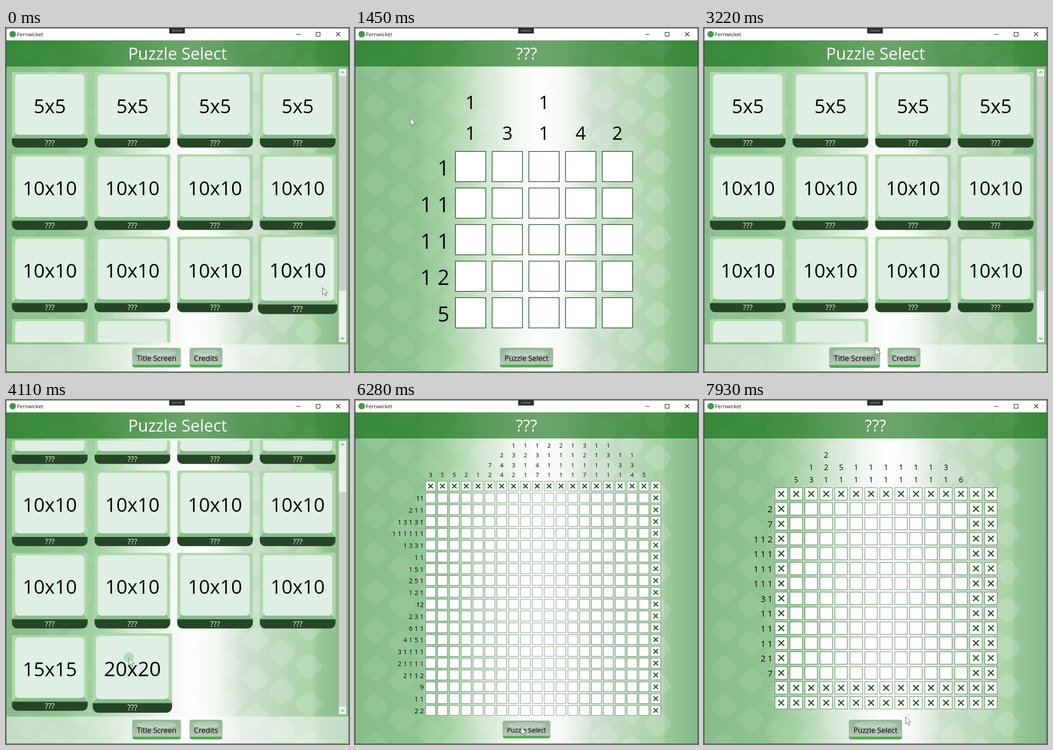
An HTML page with a canvas for the animation above (8000 ms loop, 746 by 751 pixels).

```html
<!DOCTYPE html>
<html lang="en">
<head>
<meta charset="utf-8">
<title>Puzzle Select</title>
<style>
  html, body { margin: 0; width: 100%; height: 100%; overflow: hidden; background: #fff; }
  canvas { display: block; }
</style>
</head>
<body>
<canvas id="stage" width="746" height="751"></canvas>
<script>
const W = 746, H = 751, LOOP = 8000;
const ctx = document.getElementById('stage').getContext('2d');

// Pointer moves; one that names a screen ends with a click that opens it.
const START = { x: 688, y: 566 };
const MOVES = [
  { from: 120, to: 480, x: 569, y: 617 },
  { from: 680, to: 1150, x: 120, y: 196, opens: 'small' },
  { from: 1650, to: 2400, x: 410, y: 708 },
  { from: 2860, to: 2870, x: 410, y: 708, opens: 'select' },
  { from: 3130, to: 3220, x: 372, y: 698 },
  { from: 3290, to: 3920, x: 267, y: 563, opens: 'large' },
  { from: 4320, to: 4680, x: 313, y: 431 },
  { from: 4880, to: 5640, x: 500, y: 671 },
  { from: 5710, to: 6150, x: 361, y: 714, opens: 'select' },
  { from: 6500, to: 7100, x: 105, y: 669, opens: 'medium' },
  { from: 7430, to: 7930, x: 438, y: 691 }
];
const PRESS = 90, RELEASE = 180, OPEN = 260;

// x, y: middle of the first cell. Clues: one base-36 digit per number.
const PUZZLES = {
  small: { x: 251.5, y: 302.5, pitch: 79.8, cols: '11 3 11 4 2', rows: '1 11 11 12 5' },
  medium: {
    x: 168, y: 205, pitch: 32.57,
    cols: '0 5 13 221 51 11 11 11 11 11 11 31 6 0 0',
    rows: '0 2 7 112 111 111 111 31 11 11 11 21 7 0 0'
  },
  large: {
    x: 164.5, y: 188, pitch: 25.77,
    cols: '3 5 5 2 1 72 244 1332 1211 1347 2111 2111 1111 3217 1111 1311 131 134 5 0',
    rows: '0 b 211 13131 111111 1331 11 151 251 121 c 231 611 4151 31111 21111 2112 9 11 22'
  }
};
const parseClues = str => str.split(' ').map(clue => [...clue].map(d => parseInt(d, 36)));

function stateAt(t) {
  let { x, y } = START, screen = 'select', down = false, released = -1;
  for (const move of MOVES) {
    if (t < move.from) break;
    const s = Math.min(1, (t - move.from) / (move.to - move.from));
    const ease = s * s * (3 - 2 * s), rest = 1 - ease;
    // The path bows upwards by half its length.
    const dx = move.x - x, dy = move.y - y, bow = 0.5 * Math.sign(dx);
    const mix = (a, bend, b) => rest * rest * a + 2 * rest * ease * bend + ease * ease * b;
    const bendX = x + dx / 2 + bow * dy, bendY = y + dy / 2 - bow * dx;
    x = mix(x, bendX, move.x);
    y = mix(y, bendY, move.y);
    const age = t - move.to;
    if (!move.opens || age < PRESS) continue;
    down = age < RELEASE;
    released = age < OPEN ? age - RELEASE : -1;
    if (age >= OPEN) screen = move.opens;
  }
  return { x, y, down, released, screen };
}

// Wheel steps down to the end; the end moves up once no tile there is grown.
const scrollAt = t => Math.max(0, Math.min(t < 6000 ? 121.6 : 118.5, 48 * Math.floor((t - 3400) / 100)));

function rect(x, y, w, h, fill) {
  ctx.fillStyle = fill;
  ctx.fillRect(x, y, w, h);
}

function round(x, y, w, h, radii, fill) {
  ctx.beginPath();
  ctx.roundRect(x, y, w, h, radii);
  ctx.fillStyle = fill;
  ctx.fill();
}

function disc(x, y, r, fill) {
  ctx.beginPath();
  ctx.arc(x, y, r, 0, Math.PI * 2);
  ctx.fillStyle = fill;
  ctx.fill();
}

function polygon(points, fill) {
  ctx.beginPath();
  points.forEach(([x, y]) => ctx.lineTo(x, y));
  ctx.closePath();
  ctx.fillStyle = fill;
  ctx.fill();
}

function stroke(color, width) {
  ctx.strokeStyle = color;
  ctx.lineWidth = width;
  ctx.stroke();
}

function cross(x, y, arm, color, width) {
  ctx.beginPath();
  for (const d of [arm, -arm]) {
    ctx.moveTo(x - arm, y - d);
    ctx.lineTo(x + arm, y + d);
  }
  stroke(color, width);
}

// y is the middle of the capitals and digits.
function text(str, x, y, size, color = '#000', align = 'center') {
  ctx.font = `${size}px "Open Sans", "Noto Sans", sans-serif`;
  ctx.textAlign = align;
  ctx.fillStyle = color;
  ctx.fillText(str, x, y + size * 0.36);
}

function gradient(x0, y0, x1, y1, stops) {
  const g = ctx.createLinearGradient(x0, y0, x1, y1);
  stops.forEach(([at, color]) => g.addColorStop(at, color));
  return g;
}

// Draws around a centre, grown when hovered and shrunk when pressed.
function pressable(cx, cy, w, h, pointer, draw) {
  const over = Math.abs(pointer.x - cx) <= w / 2 + 1 && Math.abs(pointer.y - cy) <= h / 2 + 2;
  const scale = !over ? 1 : pointer.down ? 0.89 : 1.05;
  ctx.save();
  ctx.translate(cx, cy);
  ctx.scale(scale, scale);
  draw(-w / 2, -h / 2);
  ctx.restore();
}

function diamonds(x0, y0, alpha) {
  for (let k = 0; k < 5; k++) {
    for (let y = (y0 + 28 * k) % 83 - 83; y < H + 40; y += 83) {
      ctx.save();
      ctx.translate(x0 + 58 * k, y);
      ctx.rotate(Math.PI / 4);
      round(-23, -23, 46, 46, 12, `rgba(240,250,248,${alpha})`);
      ctx.restore();
    }
  }
}

function background(shift) {
  rect(0, 0, W, H, gradient(0, 0, W, 0, [
    [0, '#87bd8b'], [0.18, '#90c492'], [0.28, '#a8d3a6'], [0.36, '#cce4cb'], [0.47, '#f0f7f0'],
    [0.54, '#fff'], [0.61, '#f3f8f3'], [0.69, '#cfe2d0'], [0.8, '#bad8b9'], [0.9, '#a8d2a3'],
    [0.905, '#9bc99b'], [1, '#84b989']]));
  diamonds(44, 88 + shift, 0.06);
  diamonds(427, 97 + shift, 0.17);
}

function header(title) {
  rect(0, 27, W, 57, 'rgba(0,100,0,.58)');
  text(title, 373, 56, 36, '#fff');
}

function button(label, cx, w, pointer) {
  pressable(cx, 719.5, w, 43, pointer, (x, y) => {
    round(x, y, w, 43, 5, '#4bb04e');
    round(x, y, w, 37, [5, 5, 0, 0], gradient(0, y, 0, y + 37, [[0, '#93b996'], [0.5, '#a3b8a5'], [1, '#b7cab8']]));
    ctx.beginPath();
    ctx.ellipse(0, y + 11, w * 0.4, 8, 0, 0, Math.PI * 2);
    ctx.fillStyle = gradient(0, y + 3, 0, y + 19, [[0, 'rgba(225,232,226,.2)'], [1, 'rgba(225,232,226,.6)']]);
    ctx.fill();
    text(label, 0, 1.5, 16);
  });
}

function tile(cx, cy, label, pointer) {
  pressable(cx, cy, 164.5, 165, pointer, (x, y) => {
    round(x, y, 164.5, 147, [3, 3, 0, 0], '#aed8aa');
    polygon([[x, y + 145], [x + 164.5, y + 145], [x + 154, y + 133], [x + 10.5, y + 133]], '#86bd8a');
    round(x + 7, y + 5, 150.5, 132, 8, '#dfefe3');
    round(x, y + 145, 164.5, 20, [0, 0, 12, 12], '#264526');
    text(label, 0, -8, 42);
    text('???', 0, 72.5, 16.5, '#fff');
  });
}

function scrollbar(scroll) {
  rect(724, 89, 16, 597, '#f0f0f0');
  rect(724, 105 + scroll * 0.785, 16, 469, '#cdcdcd');
  for (const [y, d] of [[97, 2], [678, -2]]) {
    ctx.beginPath();
    ctx.moveTo(728.5, y + d);
    ctx.lineTo(732, y - d);
    ctx.lineTo(735.5, y + d);
    stroke('#777', 1.2);
  }
}

function selectScreen(t, pointer) {
  const scroll = scrollAt(t);
  background(40);
  header('Puzzle Select');
  ctx.save();
  ctx.beginPath();
  ctx.rect(0, 88.5, 722, 597.5);
  ctx.clip();
  const inList = pointer.y < 686 ? pointer : { x: -99, y: -99 };
  for (let i = 0; i < 14; i++) {
    const size = i < 4 ? 5 : i < 12 ? 10 : i < 13 ? 15 : 20;
    tile(95.2 + 179.7 * (i % 4), 178.5 + 179.7 * Math.floor(i / 4) - scroll, `${size}x${size}`, inList);
  }
  ctx.restore();
  scrollbar(scroll);
  rect(0, 691, W, 60, 'rgba(255,255,255,.5)');
  button('Title Screen', 327.5, 105.5, pointer);
  button('Credits', 435, 71, pointer);
}

function puzzleScreen({ x: x0, y: y0, pitch, ...clues }, pointer) {
  const cols = parseClues(clues.cols), rows = parseClues(clues.rows);
  const cell = pitch * 0.827, half = cell / 2;
  const ink = clue => clue[0] ? '#000' : 'rgba(0,60,0,.13)';
  background(0);
  header('???');
  cols.forEach((clue, i) => [...clue].reverse().forEach((n, k) =>
    text(n, x0 + i * pitch, y0 - 1.4 - pitch * (0.895 + 0.835 * k), pitch * 0.5, ink(clue))));
  rows.forEach((clue, j) => {
    const y = y0 + j * pitch;
    text(clue.join(' '), x0 - pitch * 0.58, y + pitch * 0.04, pitch * 0.565, ink(clue), 'right');
    cols.forEach((colClue, i) => {
      const x = x0 + i * pitch;
      rect(x - half, y - half, cell, cell, '#fff');
      ctx.strokeStyle = '#0f3815';
      ctx.lineWidth = Math.min(1.3, pitch * 0.02);
      ctx.strokeRect(x - half, y - half, cell, cell);
      if (!clue[0] || !colClue[0]) cross(x, y, pitch * 0.19, '#1c571c', 1.2 + pitch * 0.042);
    });
  });
  button('Puzzle Select', 373, 116, pointer);
}

function windowFrame() {
  rect(0, 0, W, 27, '#fff');
  disc(14.5, 13.5, 7, '#3f9a48');
  text('Fernwicket', 24, 14, 11.3, '#111', 'left');
  rect(631, 13.5, 10, 1, '#111');
  cross(722.5, 13.5, 4.5, '#111', 1.1);
  ctx.strokeRect(674.5, 9.5, 8.5, 8.5);
  ctx.strokeStyle = '#3a463a';
  ctx.lineWidth = 1;
  ctx.strokeRect(0.5, 0.5, W - 1, H - 1);
  rect(355, 0, 34, 12, '#2b2d2b');
  rect(361, 4, 22, 4, '#565856');
}

function drawPointer({ x, y, released }) {
  if (released >= 0) disc(x, y - 1, 10.5 + released * 0.03, 'rgba(130,195,135,.5)');
  ctx.save();
  ctx.translate(x, y);
  polygon([[0.5, 0.5], [0.5, 16.5], [4.2, 13], [6.8, 19], [9.2, 18], [6.6, 12.2], [11.8, 12]], '#fff');
  stroke('#556055', 1);
  ctx.restore();
}

function frame(now) {
  const t = now % LOOP, pointer = stateAt(t);
  if (pointer.screen === 'select') selectScreen(t, pointer);
  else puzzleScreen(PUZZLES[pointer.screen], pointer);
  windowFrame();
  drawPointer(pointer);
  requestAnimationFrame(frame);
}
requestAnimationFrame(frame);
</script>
</body>
</html>
```
